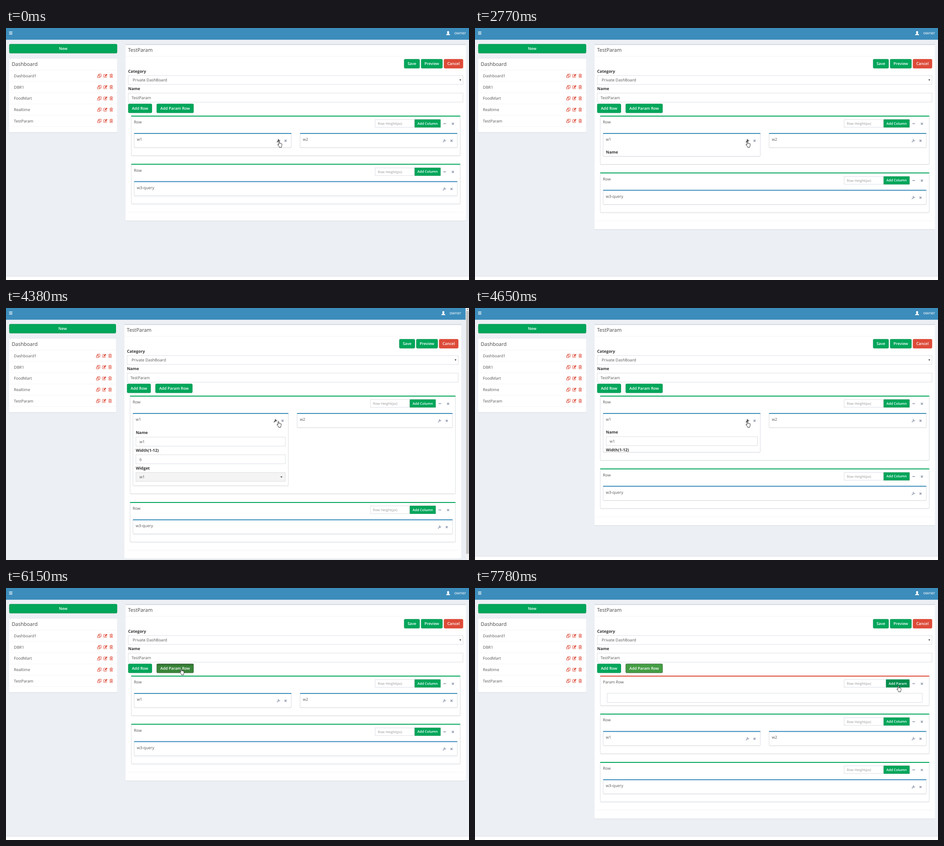
Animation of 1014 by 552 pixels, one loop 8000 ms. Source, as an HTML page:

```html
<!DOCTYPE html>
<html lang="en">
<head>
<meta charset="utf-8">
<title>Dashboard editor</title>
<style>
html, body { margin: 0; width: 100%; height: 100%; overflow: hidden; background: #ecf0f5; }
svg { display: block; width: 1014px; height: 552px; }
text { font-family: "Open Sans", "Noto Sans", sans-serif; text-rendering: geometricPrecision; white-space: pre; }
</style>
</head>
<body>
<svg id="stage" viewBox="0 0 1014 552"></svg>
<script>
const LOOP = 8000;
const GREEN = '#00a65a', DARK_GREEN = '#008d4c', RED = '#dd4b39', BLUE = '#3c8dbc';
const BORDER = '#d2d6de', MUTED = '#97a0b3';

// time, pointer kind, x, y, widget expansion, flags
const steps = [
  [0, 'hand', 594.4, 248, 0, 'dark'],
  [250, 'hand', 594, 248, 0, 'dark'],
  [890, 'hand', 588.5, 248, 0, 'dark'],
  [1160, 'arrow', 566, 226, 0, ''],
  [1430, 'move', 484, 263, 0, ''],
  [1690, 'move', 575.4, 259.5, 0, ''],
  [1960, 'move', 586, 251.3, 0, ''],
  [2230, 'hand', 592.8, 248, 0, 'dark'],
  [2500, 'hand', 592.8, 248, 0, 'dark press'],
  [2770, 'hand', 592.8, 248, 19, 'dark'],
  [3040, 'hand', 592.8, 248, 103, 'dark narrow'],
  [3320, 'hand', 592.8, 248, 127.3, 'dark narrow'],
  [4100, 'hand', 592.8, 248, 127.3, 'dark narrow press'],
  [4380, 'hand', 592.8, 248, 127.3, 'dark narrow'],
  [4650, 'hand', 592.8, 248, 54, 'dark'],
  [5000, 'move', 530, 221, 4, 'dark'],
  [5300, 'move', 454.2, 203.7, 2.4, 'dark'],
  [5410, 'arrow', 395, 185, 0, 'dark'],
  [5690, 'hand', 380.6, 176.3, 0, 'dark hover'],
  [5900, 'hand', 380, 176.8, 0, 'dark hover'],
  [6150, 'hand', 380, 176.8, 0, 'active'],
  [6430, 'hand', 380, 176.8, 0, 'param hover'],
  [6990, 'arrow', 767, 238, 0, 'param focus'],
  [7280, 'arrow', 894, 229, 0, 'param focus'],
  [7510, 'hand', 923.3, 214, 0, 'param focus'],
  [7780, 'hand', 923.3, 214, 0, 'param focus add']
];

const icons = {
  copy: '<path d="M-1-1.2V-3.8H3.9V2.2H-.6M-1.6-1.8H1V4H-4V.6L-1.6-1.8V.6H-4M-1-3.8-2.9-2" fill="none" stroke="#dd4b39" stroke-width=".9"/>',
  edit: '<path d="M1.6-3H-3A1 1 0 0 0-4-2V2.6a1 1 0 0 0 1 1H1.8a1 1 0 0 0 1-1V1" fill="none" stroke="#dd4b39" stroke-width=".9"/><path d="M-1.6 1.8V0L2.8-4.2 4.5-2.5.2 1.8Z" fill="#dd4b39"/>',
  trash: '<path d="M-3.6-2.5H3.6M-1.4-2.6V-3.9H1.4V-2.6M-2.7-2.4V3.8H2.7V-2.4M-1.1-.9V2.4M0-.9V2.4M1.1-.9V2.4" fill="none" stroke="#dd4b39" stroke-width=".8"/>',
  user: '<path d="M0-4.4C3-4.4 2.6-.6 1.2.5 1.3 1.6 4.3 1.5 4.4 4.3H-4.4C-4.3 1.5-1.3 1.6-1.2.5-2.6-.6-3-4.4 0-4.4Z" fill="#fff"/>',
  minus: `<path d="M-3 0H3" stroke="${MUTED}" stroke-width="1.7"/>`,
  close: `<path d="M-2.1-2.1 2.1 2.1M2.1-2.1-2.1 2.1" stroke="${MUTED}" stroke-width="1.7"/>`,
  caret: '<path d="M-2.4-1.2H2.4L0 1.4Z" fill="#333"/>'
};

const pointers = {
  hand: 'M2.8 8V1.3a1 1 0 0 1 2 0V5a.9.9 0 0 1 1.8.2.9.9 0 0 1 1.7.4.8.8 0 0 1 1.5.5V9.5L8.9 11.8V13.4H4.2V12.2L.6 7.8A.9.9 0 0 1 2 6.9Z',
  arrow: 'M0 0V11L2.6 8.6 4.3 12.6 6 11.9 4.4 8H7.8Z',
  move: 'M0-7 2.8-4H1.1V-1.1H4V-2.8L7 0 4 2.8V1.1H1.1V4H2.8L0 7-2.8 4H-1.1V1.1H-4V2.8L-7 0-4-2.8V-1.1H-1.1V-4H-2.8Z'
};

const at = (x, y, body) => `<g transform="translate(${x} ${y})">${body}</g>`;
const icon = (name, x, y) => at(x, y, icons[name]);
const rect = (l, t, r, b, fill, extra = '') =>
  `<rect x="${l}" y="${t}" width="${r - l}" height="${b - t}" fill="${fill}" ${extra}/>`;
const line = (l, r, y, color = '#f2f2f2') => rect(l, y - .4, r, y + .4, color);
const text = (str, x, middle, size = 8.7, color = '#555', extra = '') =>
  `<text x="${x}" y="${middle + size * .36}" font-size="${size}" fill="${color}" ${extra}>${str}</text>`;
const label = (str, x, y) => text(str, x, y, 8.8, '#333', 'font-weight="700"');
const field = (l, t, r, b, fill = '#fff') =>
  rect(l + .4, t + .4, r - .4, b - .4, fill, `stroke="${BORDER}" stroke-width=".8"`);

function card(l, t, r, b, top) {
  return rect(l, t + 1, r, b + 1, '#000', 'opacity=".1" rx="2"') +
    rect(l, t, r, b, '#fff', 'rx="2"') + (top ? rect(l, t, r, t + 2, top, 'rx="1"') : '');
}

function outlined(l, t, r, b, top) {
  return card(l, t, r, b) +
    rect(l + .4, t + .6, r - .4, b, 'none', `stroke="${BORDER}" stroke-width=".8" rx="2"`) +
    rect(l, t, r, t + 2, top, 'rx="1"');
}

function button(str, l, t, r, b, fill = GREEN, size = 8.5, stroke = fill === RED ? '#d73925' : DARK_GREEN, rx = 2) {
  return rect(l + .4, t + .4, r - .4, b - .4, fill, `stroke="${stroke}" stroke-width=".8" rx="${rx}"`) +
    text(str, (l + r) / 2, (t + b) / 2, size, '#fff', 'font-weight="600" text-anchor="middle"');
}

function wrench(x, y, color) {
  return at(x, y, `<g fill="none" stroke="${color}" stroke-linecap="round">
    <path d="M-2.7 2.7.8-.8" stroke-width="1.6"/>
    <path d="M3.2-1.5A1.9 1.9 0 1 1 1.5-3.2" stroke-width="1.3" stroke-linecap="butt"/></g>`);
}

function sidebar(right) {
  let out = button('New', 7, 35, right, 55.5) + card(7, 67.5, right, 228.5) +
    text('Dashboard', 12.5, 79.3, 11, '#444') + line(7, right, 92.3);
  ['Dashboard1', 'DBR1', 'FoodMart', 'Realtime', 'TestParam'].forEach((name, i) => {
    const y = 104.7 + i * 24.7;
    out += text(name, 17.3, y) + line(7, right, y + 12.3) +
      icon('copy', right - 39, y) + icon('edit', right - 25.8, y) + icon('trash', right - 13, y);
  });
  return out;
}

function rowFrame(l, r, t, b, title, color, action, split, fill) {
  return outlined(l, t, r, b, color) + text(title, l + 6, t + 14) +
    field(r - 187, t + 8.3, split, t + 26) +
    text('Row Height(px)', r - 181, t + 17.5, 7.6, '#999') +
    button(action, split, t + 8.3, r - 43.5, t + 26, fill, 7.5, undefined, 0) +
    icon('minus', r - 34.5, t + 17.5) + icon('close', r - 16.5, t + 17.7);
}

function widget(name, l, r, t, grow = 0, color = MUTED) {
  return outlined(l, t, r, t + 32 + grow, BLUE) + text(name, l + 6.3, t + 14) +
    wrench(r - 28.8, t + 17, color) + icon('close', r - 13, t + 17);
}

function widgetForm(l, r, grow) {
  const a = l + 6.5, b = r - 6.5, dy = grow > 120 ? 0 : -1;
  return `<clipPath id="slide"><rect x="${l}" y="262" width="${r - l}" height="${Math.max(0, grow - .5)}"/></clipPath>
    <g clip-path="url(#slide)"><g transform="translate(0 ${dy})">` +
    label('Name', a, 273.3) + field(a, 282.5, b, 303) + text('w1', a + 8, 293) +
    label('Width(1-12)', a, 312) + field(a, 321, b, 341.5) + text('6', a + 8, 331.5) +
    label('Widget', a, 350.6) + field(a, 359.8, b, 380.3, '#f4f4f4') + text('w1', a + 8, 370) +
    icon('caret', b - 9, 370.2) + '</g></g>';
}

function paramButton(l, has) {
  const box = [l, 165.8, l + 81.3, 186.2];
  const draw = (fill, stroke) => button('Add Param Row', ...box, fill, 8.5, stroke);
  if (has('active')) return draw('#398439', '#255625') + rect(l + 1, 166.5, l + 80.3, 171, 'url(#inset)');
  if (has('focus')) return draw('#449d44', '#255625');
  return has('hover') ? draw(DARK_GREEN, '#0b7a43') : draw(GREEN);
}

function scene([, pointer, px, py, grow, flags]) {
  const has = flag => flags.split(' ').includes(flag);
  const shrink = has('narrow') ? 10.5 : 0;
  const L = 261.8 - shrink / 4, R = 1007.7 - shrink;
  const a = L + 5.7, b = R - 6.5;
  const rowL = L + 12.2, rowR = R - 12.5;
  const colL = rowL + 6.3, colR = rowR - 6.5, colW = (colR - colL - 18.5) / 2;
  const shift = has('param') ? 83.3 : 0;
  const first = 192 + shift, second = first + 105.6 + grow;
  const rowsEnd = second + 87.7, cardEnd = rowsEnd + 36.6;
  const footer = Math.max(544, cardEnd + 20.7);

  let out = `<defs><linearGradient id="inset" x2="0" y2="1">
    <stop stop-opacity=".2"/><stop offset="1" stop-opacity="0"/></linearGradient></defs>` +
    rect(0, 0, 1014, 552, '#ecf0f5') + rect(0, footer, 1014, 560, '#fff') + line(0, 1014, footer, BORDER) +
    rect(0, 0, 1014, 25.7, BLUE);
  for (const y of [8.4, 11, 13.6]) out += rect(6.7, y - .6, 14, y + .6, '#fff');
  out += icon('user', 968.3 - shrink, 11.2) + text('owner', 981.7 - shrink, 11, 8.8, '#fff') +
    sidebar(243.5 - shrink / 4);

  out += card(L, 35.3, R, cardEnd, BORDER) + text('TestParam', a - .3, 48.4, 11, '#444') + line(L, R, 62) +
    button('Save', b - 129.5, 68, b - 95, 88.5) + button('Preview', b - 92.3, 68, b - 45, 88.5) +
    button('Cancel', b - 42.3, 68, b, 88.5, RED) +
    label('Category', a, 94.6) + field(a, 103.7, b, 124.2) + text('Private DashBoard', a + 10, 114.2) +
    at(b - 6.2, 114, '<path d="M-1.9-1.5H1.9L0 1.7Z" fill="#333"/>') +
    label('Name', a, 133) + field(a, 142.2, b, 162.7) + text('TestParam', a + 7.5, 152.8) +
    button('Add Row', a, 165.8, a + 52.3, 186.2) + paramButton(a + 62.3, has);

  if (shift) {
    out += rowFrame(rowL, rowR, 192, 257.7, 'Param Row', RED, 'Add Param', rowR - 95, has('add') ? DARK_GREEN : GREEN) +
      field(rowL + 15.3, 230, rowR - 15.3, 251.2);
  }
  out += rowFrame(rowL, rowR, first, first + 87.7 + grow, 'Row', GREEN, 'Add Column', rowR - 100.3) +
    widget('w1', colL, colL + colW, first + 38, grow, has('dark') ? '#333' : MUTED) +
    widget('w2', colR - colW, colR, first + 38) +
    rowFrame(rowL, rowR, second, rowsEnd, 'Row', GREEN, 'Add Column', rowR - 100.3) +
    widget('w3-query', colL, colR, second + 38) + line(a, b, rowsEnd + 18, '#f0f0f0');
  if (grow) out += widgetForm(colL, colL + colW, grow);
  if (has('press')) {
    const x = colL + colW - 28.8;
    out += rect(x - 7.3, 237.3, x + 7.3, 255.7, 'none', 'stroke="#000" stroke-opacity=".07" rx="2"') +
      rect(x - 7.3, 237.3, x + 7.3, 241.5, 'url(#inset)');
  }
  if (shrink) {
    out += rect(1006.5, 0, 1014, 552, '#f1f1f1') + rect(1007.7, 6.5, 1013.6, grow > 120 ? 538.5 : 552, '#c1c1c1') +
      at(1010.8, 2.8, '<path d="M-2 1.3H2L0-1.3Z" fill="#777"/>');
  }
  return out + at(px, py, `<path d="${pointers[pointer]}" fill="#fff" stroke="#222" stroke-width=".9" stroke-linejoin="round"/>`);
}

const stage = document.getElementById('stage');
const start = performance.now();
let shown;
function tick() {
  const t = (performance.now() - start) % LOOP;
  const step = steps.findLast(s => s[0] <= t);
  if (step !== shown) stage.innerHTML = scene(shown = step);
  requestAnimationFrame(tick);
}
tick();
</script>
</body>
</html>
```
